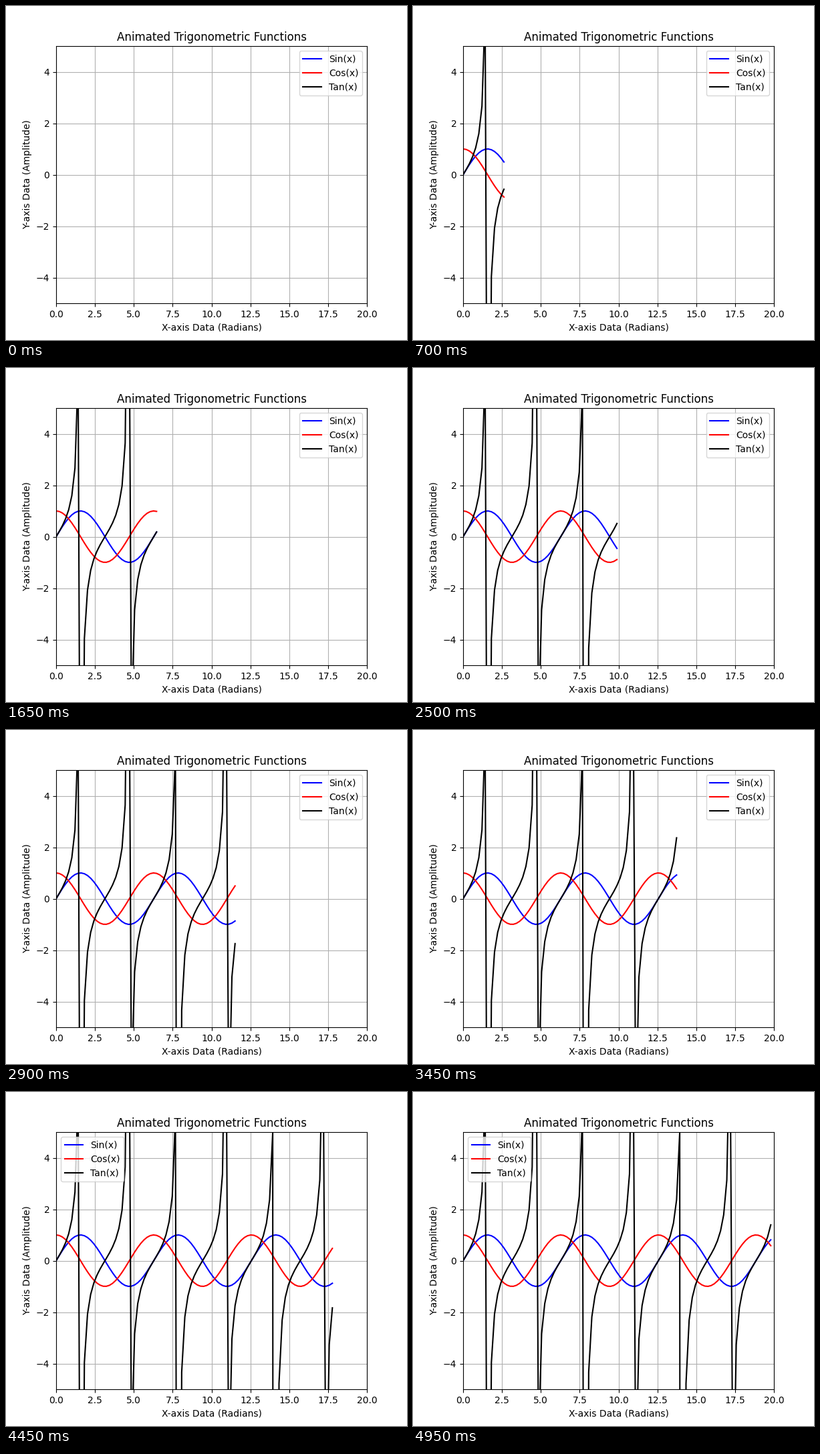
Write a matplotlib script that moves like this. It is 600 by 500 pixels and loops after 5 s.

```python
import numpy as np
import matplotlib.pyplot as plt
from matplotlib.animation import FuncAnimation

FRAMES = 100
INTERVAL = 50

x = np.linspace(0, 20, FRAMES)
curves = [
    ("Sin(x)", "blue", np.sin(x)),
    ("Cos(x)", "red", np.cos(x)),
    ("Tan(x)", "black", np.tan(x)),
]

fig, ax = plt.subplots(figsize=(6, 5), dpi=100)
ax.set_xlim(0, 20)
ax.set_ylim(-5, 5)
ax.set_title("Animated Trigonometric Functions")
ax.set_xlabel("X-axis Data (Radians)")
ax.set_ylabel("Y-axis Data (Amplitude)")
ax.grid(True)

lines = [ax.plot([], [], color=color, label=label)[0]
         for label, color, _ in curves]
# "best" is re-evaluated on every draw, so the legend jumps away from the curves
ax.legend(loc="best")


def update(frame):
    for line, (_, _, y) in zip(lines, curves):
        line.set_data(x[:frame], y[:frame])
    return lines


anim = FuncAnimation(fig, update, frames=FRAMES, interval=INTERVAL,
                     init_func=lambda: update(0), repeat=True,
                     repeat_delay=0, blit=False)

plt.show()
```
